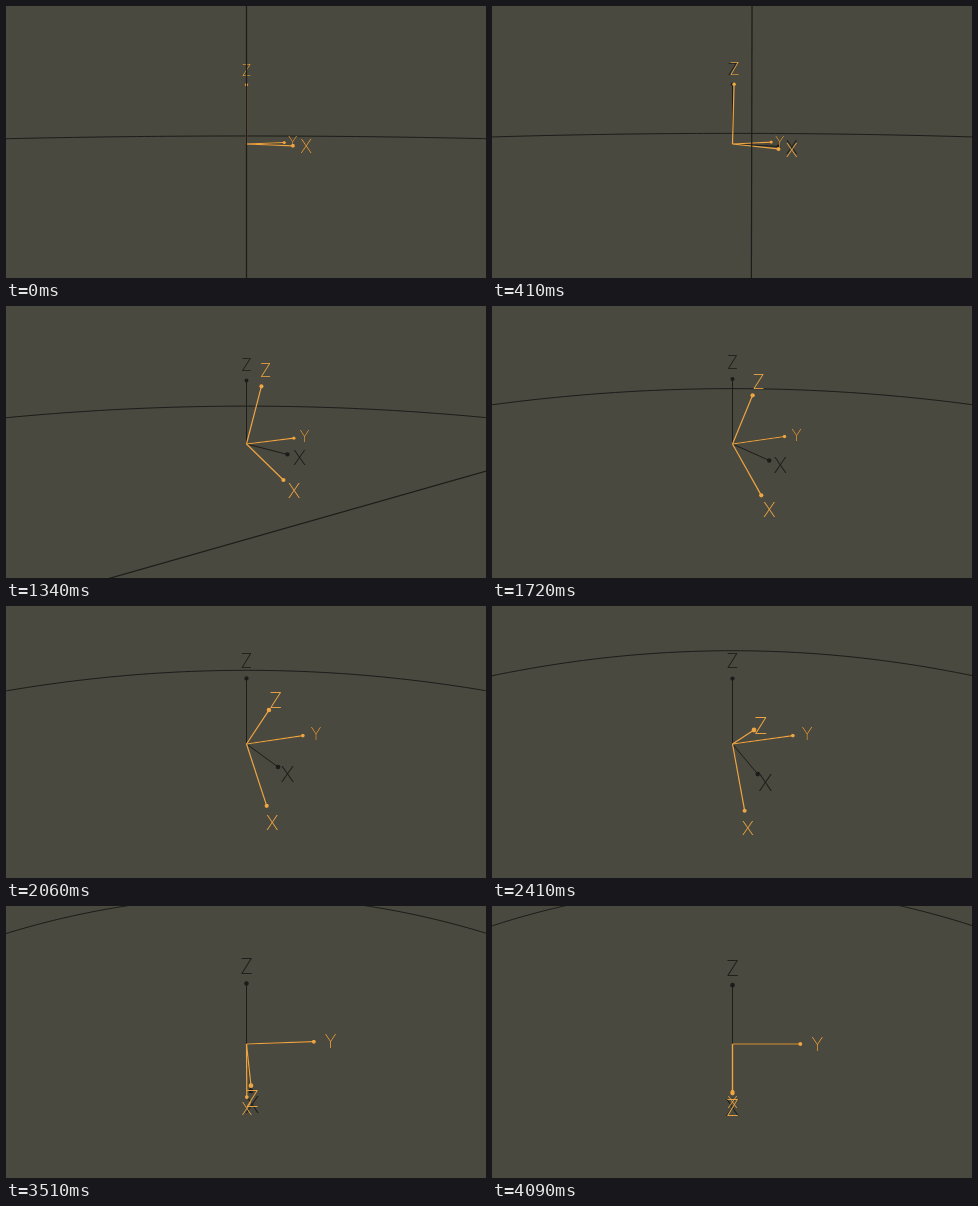
Write an HTML page with a canvas that moves like this. It is 480x272 px and loops after 4120 ms.

```html
<!DOCTYPE html>
<html lang="en">
<head>
<meta charset="utf-8">
<title>Rotating axes</title>
<style>
html, body { margin: 0; width: 100%; height: 100%; overflow: hidden; background: #49493f; }
canvas { display: block; width: 480px; height: 272px; }
</style>
</head>
<body>
<canvas id="stage" width="480" height="272"></canvas>
<script>
const ctx = document.getElementById('stage').getContext('2d');
const W = 480, H = 272, CX = 240.5, CY = 138;
const LOOP = 4120, STEPS = 120;
const FOCAL = 407, RING = 7, NEAR = 0.03;
const BACK = '#49493f', DARK = '#1c1c1a', GOLD = '#eea544';

const dot = (a, b) => a[0] * b[0] + a[1] * b[1] + a[2] * b[2];
const mix = (a, b, k) => a.map((v, i) => v + (b[i] - v) * k);
const scale = (a, k) => a.map(v => v * k);

// Camera that always looks at the origin
function makeCamera(u) {
  const pos = [4.88 - 0.22 * u + 2.2 * u * (1 - u), -4.88 * (1 - u), 0.27 + 3.51 * u];
  const flat = Math.hypot(pos[0], pos[1]);
  const dist = Math.hypot(flat, pos[2]);
  const ca = pos[0] / flat, sa = pos[1] / flat;
  const ce = flat / dist, se = pos[2] / dist;
  const right = [-sa, ca, 0];
  const up = [-se * ca, -se * sa, ce];
  const fwd = scale(pos, -1 / dist);
  const view = p => {
    const d = p.map((v, i) => v - pos[i]);
    return [dot(d, right), dot(d, up), dot(d, fwd)];
  };
  return { pos, view };
}

function toScreen(v) {
  const k = FOCAL / v[2];
  return { x: CX + v[0] * k, y: CY - v[1] * k, k };
}

function line(cam, p, q, color, width) {
  let a = cam.view(p), b = cam.view(q);
  if (a[2] < NEAR && b[2] < NEAR) return;
  if (a[2] < NEAR) a = mix(a, b, (NEAR - a[2]) / (b[2] - a[2]));
  if (b[2] < NEAR) b = mix(b, a, (NEAR - b[2]) / (a[2] - b[2]));
  const s = toScreen(a), e = toScreen(b);
  ctx.strokeStyle = color;
  ctx.lineWidth = width;
  ctx.beginPath();
  ctx.moveTo(s.x, s.y);
  ctx.lineTo(e.x, e.y);
  ctx.stroke();
}

// Far half of the ground circle
function ring(cam) {
  const mid = Math.atan2(-cam.pos[1], -cam.pos[0]);
  ctx.strokeStyle = DARK;
  ctx.lineWidth = 1;
  ctx.beginPath();
  for (let i = -45; i <= 45; i++) {
    const a = mid + i * Math.PI / 90;
    const s = toScreen(cam.view([RING * Math.cos(a), RING * Math.sin(a), 0]));
    ctx.lineTo(s.x, s.y);
  }
  ctx.stroke();
}

// Corner of an upright panel close to the camera, which rises over it
function panel(cam, u) {
  if (u > 0.33) return;
  const x = cam.pos[0] - (1.68 - 9 * u + 12.2 * u * u);
  const y = -3.2, z = 1.055;
  line(cam, [x, y, z], [x, y, -9], DARK, 1.2);
  line(cam, [x, y, z], [x, -12, z], DARK, 1.2);
}

function axis(cam, dir, name, color, width) {
  line(cam, [0, 0, 0], dir, color, width);
  const tip = toScreen(cam.view(dir));
  ctx.fillStyle = color;
  ctx.beginPath();
  ctx.arc(tip.x, tip.y, tip.k * 0.03, 0, Math.PI * 2);
  ctx.fill();

  const tag = toScreen(cam.view(scale(dir, 1.25)));
  const size = tag.k * 0.275;
  ctx.font = `200 ${size}px Inter, "Open Sans", sans-serif`;
  ctx.fillText(name, tag.x, tag.y + size * 0.364);
}

function frame(turn, cam, color, width) {
  const c = Math.cos(turn), s = Math.sin(turn);
  axis(cam, [c, 0, -s], 'X', color, width);
  axis(cam, [0, 1, 0], 'Y', color, width);
  axis(cam, [s, 0, c], 'Z', color, width);
}

function draw(ms) {
  const t = Math.floor((ms % LOOP) / LOOP * STEPS) / (STEPS - 1);
  const u = t * t * (3 - 2 * t);
  const cam = makeCamera(u);
  ctx.fillStyle = BACK;
  ctx.fillRect(0, 0, W, H);
  ctx.textAlign = 'center';
  ctx.textBaseline = 'alphabetic';
  ring(cam);
  frame(0, cam, DARK, 1);
  frame(u * Math.PI / 2, cam, GOLD, 1.2);
  panel(cam, u);
}

let start = null;
function tick(now) {
  if (start === null) start = now;
  draw(Math.max(0, now - start));
  requestAnimationFrame(tick);
}
draw(0);
requestAnimationFrame(tick);
</script>
</body>
</html>
```
